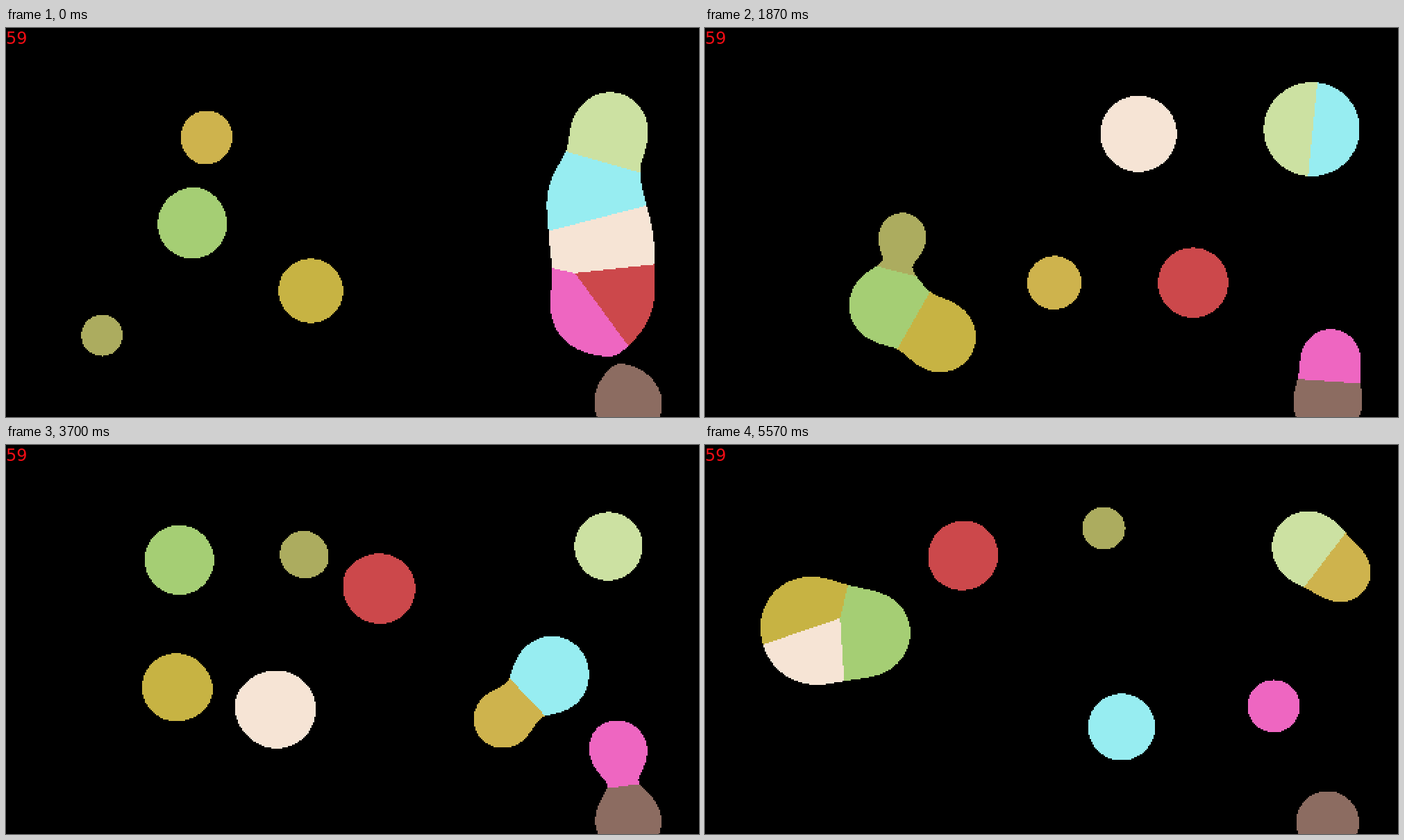
Write an HTML page with a canvas that moves like this. It is 998 by 561 pixels and loops after 5.61 s.

```html
<!DOCTYPE html>
<html lang="en">
<head>
<meta charset="utf-8">
<title>Metaballs</title>
<style>
  html, body { margin: 0; width: 100%; height: 100%; overflow: hidden; background: #000; }
  canvas { position: absolute; left: 0; top: 0; width: 998px; height: 562px; image-rendering: pixelated; }
  #fps { position: absolute; left: 0; top: 1px; font: 24px/28px "DejaVu Sans", sans-serif; color: #ee0c14; }
</style>
</head>
<body>
<canvas id="stage" width="499" height="281"></canvas>
<div id="fps">59</div>
<script>
const WIDTH = 998, HEIGHT = 561, CELL = 2;
const LOOP = 5610, FRAMES = 168, STEP = 100 / 3;

// Positions in px, velocities in px/ms; edge is the distance from the walls at which a ball bounces.
const balls = [
  { color: 0xceb34d, r: 33.7, x: 289, y: 155.5, vx: .1147, vy: .1135, edge: 74.8 },
  { color: 0xa5ce74, r: 45.5, x: 267.5, y: 283, vx: -.0051, vy: .1288, edge: 99 },
  { color: 0xc7b343, r: 43, x: 439.5, y: 379.5, vx: -.0531, vy: .053, edge: 98 },
  { color: 0xacac5f, r: 28.2, x: 138, y: 443.5, vx: .0784, vy: -.0775, edge: 66 },
  { color: 0xcce1a2, r: 45.8, x: 870.5, y: 144, vx: -.0006, vy: .0003, edge: 0 },
  { color: 0x97edf1, r: 45, x: 843, y: 241, vx: .0205, vy: -.0995, edge: 100.5,
    turn: { t: 2600, vx: -.1 } },
  { color: 0xf6e4d5, r: 50, x: 860.5, y: 308, vx: -.127, vy: -.1262, edge: 112 },
  { color: 0xee66c1, r: 33.8, x: 838, y: 412, vx: .0343, vy: .0333, edge: 74 },
  { color: 0xcc484b, r: 44.8, x: 869.5, y: 389, vx: -.0892, vy: .088, edge: 100.3 },
  { color: 0x8c6c61, r: 43, x: 897, y: 545, vx: 0, vy: 0, edge: 0 }
];

const canvas = document.getElementById('stage');
const fps = document.getElementById('fps');
const ctx = canvas.getContext('2d');
const image = ctx.createImageData(canvas.width, canvas.height);
const pixels = new Uint32Array(image.data.buffer);

const toPixel = rgb =>
  (0xff000000 | (rgb & 255) << 16 | (rgb & 0xff00) | rgb >> 16) >>> 0;
const BLACK = toPixel(0);
const fills = balls.map(ball => toPixel(ball.color));

function bounce(p, low, high) {
  while (p < low || p > high) p = 2 * (p < low ? low : high) - p;
  return p;
}

function place({ x, y, vx, vy, edge, turn }, t) {
  const first = turn ? Math.min(t, turn.t) : t;
  const later = turn ? (t - first) * turn.vx : 0;
  return {
    x: bounce(x + vx * first + later, edge, WIDTH - edge),
    y: bounce(y + vy * t, edge, HEIGHT - edge)
  };
}

// A cell is lit where the summed r²/d² exceeds 1, in the colour of the nearest ball.
function draw(t) {
  const spots = balls.map(ball => place(ball, t));
  const xs = spots.map(s => s.x), ys = spots.map(s => s.y);
  const squares = balls.map(ball => ball.r * ball.r);
  let i = 0;
  for (let row = 0; row < canvas.height; row++) {
    const py = (row + .5) * CELL;
    for (let col = 0; col < canvas.width; col++) {
      const px = (col + .5) * CELL;
      let sum = 0, nearest = 0, best = Infinity;
      for (let b = 0; b < squares.length; b++) {
        const dx = px - xs[b], dy = py - ys[b];
        const d = dx * dx + dy * dy + 1e-6;
        sum += squares[b] / d;
        if (d < best) { best = d; nearest = b; }
      }
      pixels[i++] = sum > 1 ? fills[nearest] : BLACK;
    }
  }
  ctx.putImageData(image, 0, 0);
}

let shown = -1;
const start = performance.now();

function tick() {
  const t = (performance.now() - start) % LOOP;
  const frame = Math.min(FRAMES - 1, Math.floor((Math.floor(t / 10) * 10 + 5) / STEP));
  if (frame !== shown) {
    shown = frame;
    draw(frame * STEP);
    fps.textContent = frame % 12 === 1 ? '60' : '59';
  }
  requestAnimationFrame(tick);
}
tick();
</script>
</body>
</html>
```
